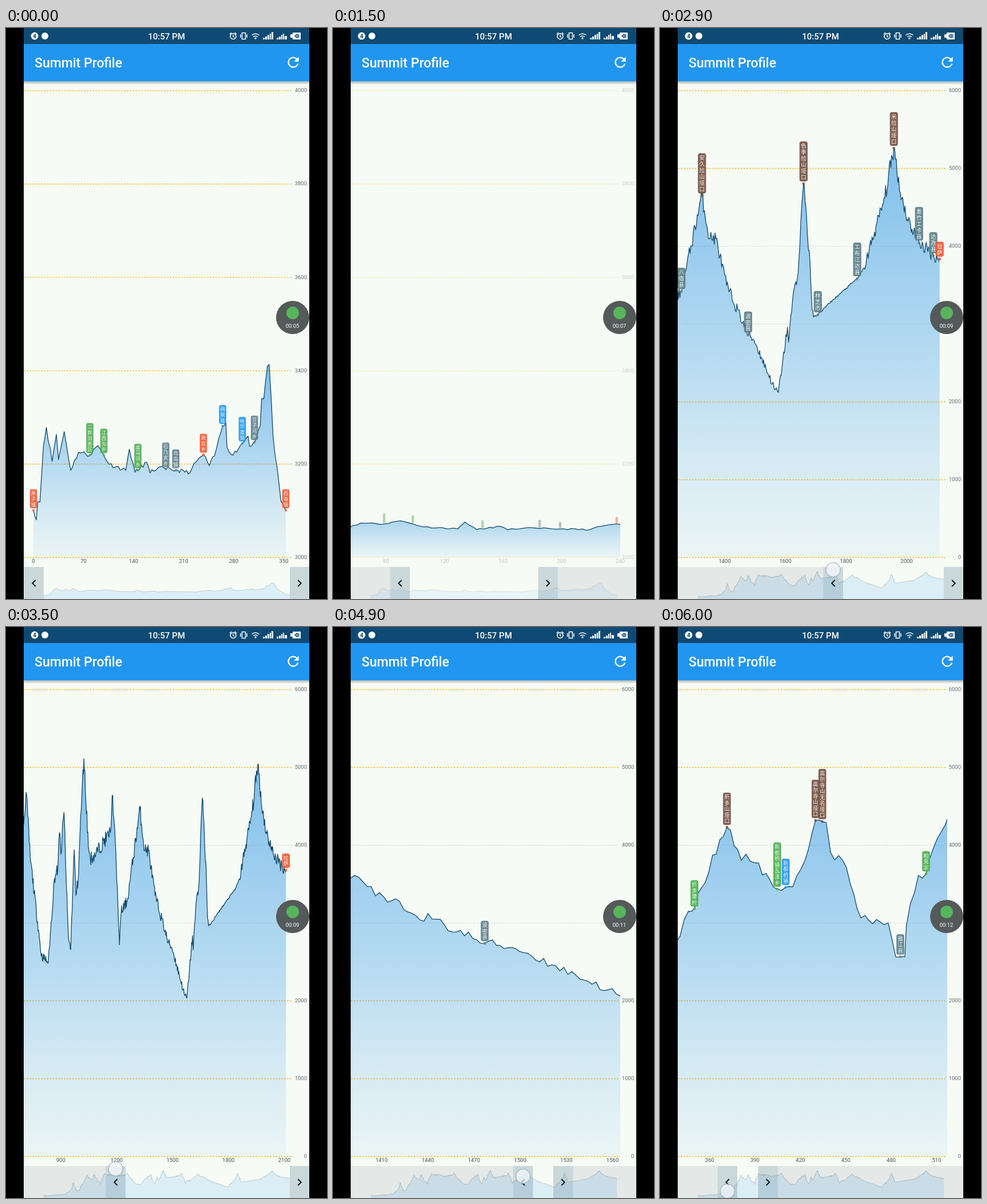
An HTML page with a canvas that plays this animation: 561x998 px, repeating every 6100 ms.

```html
<!DOCTYPE html>
<html lang="en">
<head>
<meta charset="utf-8">
<title>Summit Profile</title>
<style>
  html, body { margin: 0; width: 100%; height: 100%; overflow: hidden; background: #000; }
  canvas, svg { position: absolute; left: 0; top: 0; display: block; }
  text { font-family: Roboto, sans-serif; fill: #fff; }
</style>
</head>
<body>
<canvas id="chart" width="561" height="998"></canvas>
<svg width="561" height="998" viewBox="0 0 561 998">
  <defs>
    <linearGradient id="shade" x2="0" y2="1">
      <stop offset="0" stop-color="#5d6b74" stop-opacity=".6"/>
      <stop offset="1" stop-color="#5d6b74" stop-opacity="0"/>
    </linearGradient>
  </defs>
  <rect x="31" y="92" width="499" height="7" fill="url(#shade)"/>
  <rect x="31" width="499" height="28" fill="#0f4a74"/>
  <rect x="31" y="28" width="499" height="65" fill="#2196f0"/>
  <text x="50" y="69" font-size="23" font-weight="500">Summit Profile</text>
  <path fill="#fff" transform="translate(487.6 45.6) scale(1.2)" d="M17.65 6.35C16.2 4.9 14.21 4 12 4c-4.42 0-7.99 3.58-7.99 8s3.57 8 7.99 8c3.73 0 6.84-2.55 7.73-6h-2.08c-.82 2.33-3.04 4-5.65 4-3.31 0-6-2.69-6-6s2.69-6 6-6c1.66 0 3.14.69 4.22 1.78L13 11h7V4l-2.35 2.35z"/>
  <text x="280.5" y="19.5" font-size="15" font-weight="500" text-anchor="middle">10:57 PM</text>
  <g fill="#fff">
    <circle cx="50" cy="14" r="6.5"/>
    <circle cx="68" cy="14" r="6"/>
    <path d="M449 17h3v3h-3zm4-2h3v5h-3zm4-3h3v8h-3zm4-2h2v10h-2zm3-3h3v13h-3z"/>
    <path d="M473 17h3v3h-3zm4-2h3v5h-3zm4-3h2v8h-2zm3-2h2v10h-2zm3 4h4v6h-4z"/>
    <path d="M501 8h14v12h-14v-3h-4v-6h4z"/>
    <circle cx="436" cy="18" r="1.7"/>
  </g>
  <path d="M504 14h3m0-2.5h3v5h-3zm3 1h3m-3 3h3" stroke="#0f4a74" fill="none" stroke-width="1.5"/>
  <text x="50" y="18" font-size="10" font-weight="700" text-anchor="middle" style="fill:#0f4a74">4</text>
  <g fill="none" stroke="#fff" stroke-width="1.5">
    <circle cx="397" cy="14.5" r="5"/>
    <path d="M397 11.5v3.500l2 1M391 11l3-3m6 0l3 3M412.5 8.500h6v11h-6zM410 11v6m11-6v6"/>
    <path d="M429.5 12.500q6.500-5 13 0M432 15.500q4-3 8 0"/>
  </g>
  <circle cx="501" cy="506" r="29" fill="#545a5a"/>
  <circle cx="501" cy="498" r="11" fill="#57b55c"/>
  <text id="clock" x="500.5" y="523.5" font-size="9.5" text-anchor="middle"></text>
</svg>
<script>
const LOOP = 6100, SWAP = 1600;
const LEFT = 31, RIGHT = 502, EDGE = 530, BASE = 925, TOP = 109;
const MINI = { x: 66, w: 430, top: 942, h: 56, grip: 34.5 };
const ctx = document.getElementById('chart').getContext('2d');
const clock = document.getElementById('clock');
const COLORS = {
  red: '#ee5a36', brown: '#795548', teal: '#5f818c',
  green: '#4caf50', blue: '#2196f3', violet: '#7a62f0'
};

// Entries read "km height name"; span is the widest view that shows them.
const places = (color, span, list) => list.split(',').map(entry => {
  const [km, h, name] = entry.split(' ');
  return { km: +km, h: +h, name: [...name], color, span };
});

// Bends are "km height" turning points; places lie on the route too.
// Seeded bumps, growing with height, roughen the stretches in between.
function route(spec, bends) {
  let seed = 11;
  const rand = () => (seed = seed * 16807 % 2147483647) / 2147483647;
  const keys = [
    ...bends.split(',').map(b => b.split(' ').map(Number)),
    ...spec.marks.map(m => [m.km, m.h])
  ].sort((p, q) => p[0] - q[0]);
  const points = [keys[0]];
  for (let i = 1; i < keys.length; i++) {
    const [k0, h0] = keys[i - 1], [k1, h1] = keys[i];
    const n = Math.max(1, Math.round((k1 - k0) / 2.6));
    const calm = k0 > spec.calm[0] && k1 <= spec.calm[1] ? .15 : 1;
    for (let j = 1; j < n; j++) {
      const h = h0 + (h1 - h0) * j / n;
      points.push([k0 + (k1 - k0) * j / n, h + (rand() - .45) * h * .045 * calm]);
    }
    points.push(keys[i]);
  }
  const peak = Math.max(...points.map(p => p[1]));
  return { ...spec, points, peak, end: keys[keys.length - 1][0] };
}

const lake = route({
  low: 3000, high: 4000, step: 200, mini: .063, pale: [], calm: [0, 0],
  marks: [
    ...places('red', 9e3, '0 108 原子城,237.6 236 泉吉乡,352.8 108 西海镇'),
    ...places('green', 9e3, '78.8 235 二郎剑景区,98.4 235 江西沟乡,146 200 黑马河乡'),
    ...places('teal', 9e3, '185 203 石乃亥乡,199 200 鸟岛镇,309 265 甘子河乡'),
    ...places('blue', 9e3, '264.5 302 刚察县,292 262 哈尔盖镇')
  ]
}, '4 86,6 128,9 127,14 256,18 299,26 221,32 283,35 225,43 289,52 200,63 242,90 257,106 214,' +
   '129 200,134 249,142 196,158 219,163 194,174 206,219 195,227 219,246 211,253 233,269 310,' +
   '270.5 254,279 235,300 279,302 256,317 303,319 365,322 365,327 440,329.5 444,335 277,346 129');

const highway = route({
  low: 0, high: 6000, step: 1000, mini: .0094, pale: [3000, 4000], calm: [1690, 1860],
  marks: [
    ...places('teal', 1200, '486 2562 雅江县,796 2566 巴塘县,901 3875 芒康县,1059 3809 左贡县,' +
      '1083 3860 中林卡乡,1257 3272 八宿县,1477 2735 波密县,1707 2985 林芝市,1837 3429 工布江达县,' +
      '2041 3867 墨竹工卡县,2088 3712 达孜县'),
    ...places('brown', 1200, '371.5 4228 折多山垭口,430 4316 高尔寺山垭口,434.5 4301 高尔寺山无名垭口,' +
      '714 4669 海子山垭口,893 4154 宗巴拉山垭口,915 4370 拉乌山垭口,919 4340 无名垭口,' +
      '972 3934 觉巴山垭口,1024 5103 东达山垭口,1176 4632 业拉山垭口,1325 4449 安久拉山垭口,' +
      '1660 4596 色季拉山垭口,1958 5034 米拉山垭口'),
    ...places('red', 9e3, '0 490 成都,8 475 双流,38 440 新津,72 500 邛崃,129 595 名山,148 560 雅安,' +
      '335 2550 康定,2109 3670 拉萨'),
    ...places('green', 400, '350 3180 折多塘村,404.7 3434 新都桥镇瓦泽乡,503 3630 柏克宗,' +
      '1607 2831 东久乡,1745 3125 更张村'),
    ...places('blue', 400, '410.3 3456 新都桥镇,1634.6 3390 鲁朗镇,1693 2956 林芝镇'),
    ...places('violet', 400, '1638.6 3404 鲁朗活动板房区')
  ]
}, '191 810,239 1675,249 2560,254 2885,263 2187,282 1320,306 1396,320 2400,346 3147,362 3868,' +
   '381 3801,390 3772,415 3463,423 3800,437 4290,440 3900,448 3800,460 3060,478 3000,483 2560,' +
   '489 2566,490 2963,498 3610,513 4169,521 4560,532 4300,600 4280,622 4002,701 4265,736 3824,' +
   '833 2485,866 3566,884 3680,930 3456,941 2794,953 2650,981 3346,993 3529,1004 4191,1048 3971,' +
   '1167 4154,1187 4265,1206 3272,1215 2713,1224 3125,1349 3919,1371 3919,1406 3346,1497 2669,' +
   '1565 2060,1577 2029,1589 2331,1611 2647,1623 3125,1642 3493,1651 4130,1670 4190,1674 3900,' +
   '1681 3650,1688 3050,1860 3560,1928 4419,1979 4490,2005 4136');

// time, first and last visible km
const lakeViews = [[200, -13.6, 363.2], [700, 56, 363.2], [1200, 56, 240]];
const highwayViews = [
  [2300, -81, 2172], [2900, 1245, 2134], [3500, 701, 2148], [4200, 701, 1565],
  [4400, 701, 1565], [4900, 1390, 1565], [5500, 1585, 1762], [6000, 339, 517]
];

// from, to, dragged handle, finger height
const drags = [
  [300, 700, 0, 962], [800, 1200, 1, 962], [2400, 3500, 0, 947], [3600, 4200, 1, 960],
  [4500, 4900, 0, 960], [5000, 5500, 1, 958], [5501, 6000, 0, 986]
];

function viewAt(views, t) {
  const i = views.findIndex(v => v[0] > t);
  if (i === 0) return views[0].slice(1);
  if (i < 0) return views[views.length - 1].slice(1);
  const a = views[i - 1], b = views[i], f = (t - a[0]) / (b[0] - a[0]);
  return [a[1] + (b[1] - a[1]) * f, a[2] + (b[2] - a[2]) * f];
}

// The first route collapses, then the second springs up.
function growth(t) {
  if (t < SWAP) return Math.min(1, .93 + t / 5000, (SWAP - t) / 330);
  const u = (t - SWAP) / 1000;
  return 1 - Math.exp(-2.4 * u) * Math.cos(2.4 * u);
}

function trace(points, px, py, floor) {
  ctx.beginPath();
  for (const [k, h] of points) ctx.lineTo(px(k), py(h));
  if (floor) {
    ctx.lineTo(px(points[points.length - 1][0]), floor);
    ctx.lineTo(px(0), floor);
  }
}

function write(text, x, y, align) {
  ctx.textAlign = align;
  ctx.fillText(text, x, y);
}

function drawGrid(r, px, span, alpha) {
  ctx.globalAlpha = alpha;
  ctx.font = '9.5px Roboto, sans-serif';
  ctx.textBaseline = 'middle';
  ctx.setLineDash([3, 2]);
  for (let v = r.low; v <= r.high; v += r.step) {
    const y = BASE - (v - r.low) / (r.high - r.low) * (BASE - TOP) + .5;
    const pale = r.pale.includes(v);
    ctx.strokeStyle = pale ? '#d3d8d0' : '#f6bd35';
    ctx.lineWidth = pale ? 1 : 1.4;
    ctx.beginPath();
    ctx.moveTo(LEFT, y);
    ctx.lineTo(RIGHT - 2, y);
    ctx.stroke();
    ctx.fillStyle = '#666c6c';
    write(v, 526, y, 'right');
  }
  ctx.setLineDash([]);
  const raw = span / 5.2, unit = 10 ** Math.floor(Math.log10(raw));
  const step = Math.round(raw / unit) * unit;
  ctx.fillStyle = '#4c5254';
  for (let k = 0; k <= r.end; k += step) {
    const x = px(k);
    if (x > LEFT + 8 && x < EDGE) write(k, x, 932.5, 'center');
  }
  ctx.globalAlpha = 1;
}

function drawProfile(r, px, py) {
  ctx.save();
  ctx.beginPath();
  ctx.rect(LEFT, 93, RIGHT - LEFT, 850);
  ctx.clip();
  const fill = ctx.createLinearGradient(0, py(r.peak), 0, BASE);
  fill.addColorStop(0, 'rgba(33,142,226,.57)');
  fill.addColorStop(.5, 'rgba(60,158,232,.36)');
  fill.addColorStop(1, 'rgba(110,180,235,.09)');
  trace(r.points, px, py, BASE);
  ctx.fillStyle = fill;
  ctx.fill();
  trace(r.points, px, py);
  ctx.strokeStyle = '#124a6a';
  ctx.lineWidth = 1.3;
  ctx.lineJoin = 'round';
  ctx.stroke();
  ctx.restore();
}

function drawMark(m, x, y, s) {
  const h = m.name.length * 10.5 + 4;
  ctx.save();
  ctx.translate(x, y);
  ctx.scale(s, s);
  ctx.globalAlpha = .93 * Math.sqrt(Math.min(1, s));
  ctx.fillStyle = COLORS[m.color];
  ctx.beginPath();
  ctx.arc(0, 0, 2.3, 0, 7);
  ctx.roundRect(-6.8, -4 - h, 13.6, h, 3.5);
  ctx.fill();
  ctx.fillStyle = '#fff';
  ctx.font = '9px "Noto Sans CJK SC", "Noto Sans CJK", "Noto Sans CJK JP", sans-serif';
  m.name.forEach((c, i) => write(c, 0, 3.3 - h + i * 10.5, 'center'));
  ctx.restore();
}

function drawHandle(c, dir) {
  ctx.fillStyle = 'rgba(96,145,165,.19)';
  ctx.fillRect(c - MINI.grip / 2, MINI.top, MINI.grip, MINI.h);
  ctx.strokeStyle = '#10181c';
  ctx.lineWidth = 2;
  ctx.beginPath();
  ctx.moveTo(c - 3 * dir, 965);
  ctx.lineTo(c + 2.5 * dir, 970.5);
  ctx.lineTo(c - 3 * dir, 976);
  ctx.stroke();
}

function drawMini(r, handles, alpha) {
  const bottom = MINI.top + MINI.h;
  const px = k => MINI.x + MINI.w * k / r.end, py = h => bottom - h * r.mini;
  ctx.globalAlpha = alpha;
  trace(r.points, px, py, bottom);
  ctx.fillStyle = 'rgba(33,150,243,.13)';
  ctx.fill();
  trace(r.points, px, py);
  ctx.strokeStyle = 'rgba(105,120,125,.5)';
  ctx.lineWidth = .7;
  ctx.stroke();
  ctx.globalAlpha = 1;
  const from = handles[0] + MINI.grip / 2, to = handles[1] - MINI.grip / 2;
  ctx.fillStyle = 'rgba(0,20,40,.08)';
  ctx.fillRect(LEFT, MINI.top, from - LEFT, MINI.h);
  ctx.fillRect(to, MINI.top, EDGE - to, MINI.h);
  drawHandle(handles[0], -1);
  drawHandle(handles[1], 1);
}

function drawTouch(handles, t) {
  const drag = drags.find(d => t >= d[0] && t <= d[1]);
  if (!drag) return;
  ctx.beginPath();
  ctx.arc(handles[drag[2]] + 6 * drag[2], drag[3], 12.5, 0, 7);
  ctx.fillStyle = 'rgba(245,250,252,.72)';
  ctx.fill();
  ctx.strokeStyle = 'rgba(150,175,190,.75)';
  ctx.lineWidth = 1.5;
  ctx.stroke();
}

function draw(t) {
  const [r, views] = t < SWAP ? [lake, lakeViews] : [highway, highwayViews];
  const [k0, k1] = viewAt(views, t);
  const a = growth(t), alpha = Math.min(1, a), span = k1 - k0;
  const px = k => LEFT + (k - k0) / span * (RIGHT - LEFT);
  const py = h => BASE - h * a * (BASE - TOP) / (r.high - r.low);
  const handles = [k0, k1].map((k, i) =>
    MINI.x + MINI.w * Math.min(1, Math.max(0, k / r.end)) + (i - .5) * MINI.grip);

  ctx.fillStyle = '#000';
  ctx.fillRect(0, 0, 561, 998);
  ctx.save();
  ctx.beginPath();
  ctx.rect(LEFT, 0, EDGE - LEFT, 998);
  ctx.clip();
  ctx.fillStyle = '#f7fbf6';
  ctx.fillRect(LEFT, 0, EDGE - LEFT, 998);
  drawGrid(r, px, span, alpha > .7 ? 1 : alpha);
  drawProfile(r, px, py);
  for (const m of r.marks) {
    const x = px(m.km);
    if (a > .02 && span < m.span && x > LEFT - 8 && x < RIGHT) drawMark(m, x, py(m.h), a);
  }
  drawMini(r, handles, Math.sqrt(alpha));
  drawTouch(handles, t);
  ctx.restore();
  const seconds = 5 + Math.floor((t + 650) / 880);
  clock.textContent = '00:' + String(seconds).padStart(2, '0');
}

const start = performance.now();
function tick() {
  const t = (performance.now() - start) % LOOP;
  draw(t < 200 ? 0 : Math.floor(t / 100) * 100);
  requestAnimationFrame(tick);
}
tick();
</script>
</body>
</html>
```
